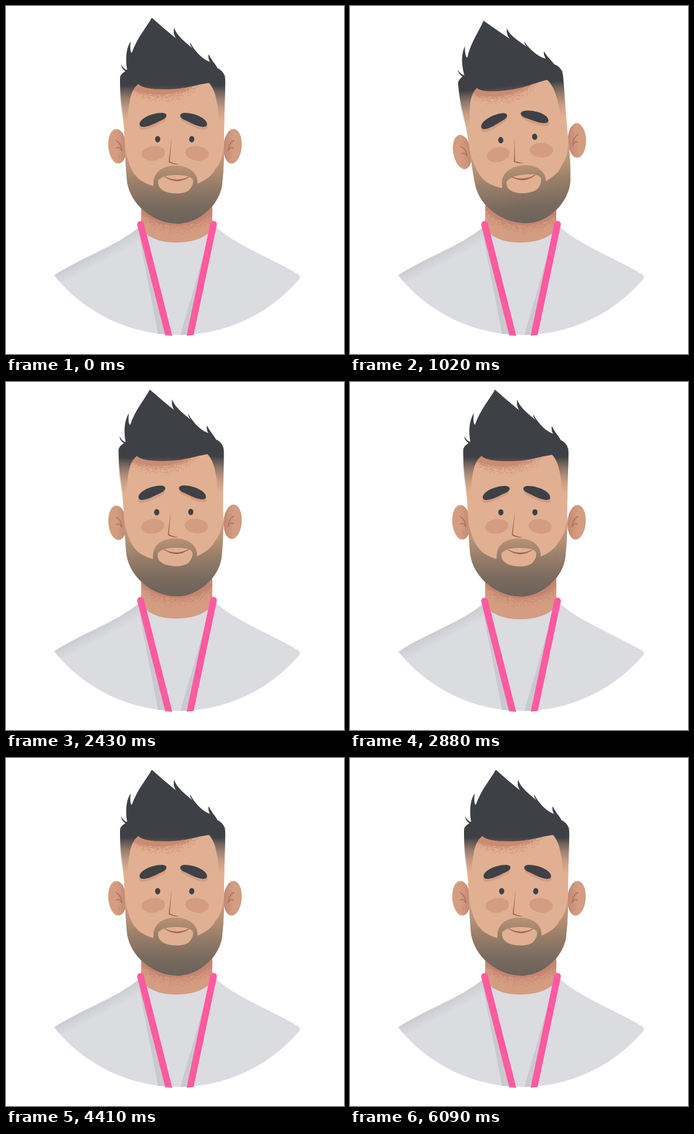
Write an HTML page with a canvas that moves like this. It is 575x593 px and loops after 6.15 s.

```html
<!DOCTYPE html>
<html lang="en">
<head>
<meta charset="utf-8">
<title>Portrait</title>
<style>
html, body { margin: 0; width: 100%; height: 100%; overflow: hidden; background: #fff; }
canvas { display: block; width: 575px; height: 593px; }
</style>
</head>
<body>
<canvas id="stage"></canvas>
<script>
const W = 575, H = 593, LOOP = 6150, STEP = 30;
const canvas = document.getElementById('stage');
const ctx = canvas.getContext('2d');
const dpr = window.devicePixelRatio || 1;
canvas.width = W * dpr;
canvas.height = H * dpr;

const INK = '#3d4146', SKIN = '#e1b092', BLUSH = '#d49d81', LINE = '#a5644f';
const SHIRT = '#dbdce0', FOLD = '#c9cacf', PINK = '#ff5aa0';

// Time/value pairs, eased in and out between neighbours
const TRACKS = {
  tilt: [150, 0, 1000, -.101, 1890, -.101, 2560, 0],
  sway: [30, 0, 600, -1.6, 1010, 0, 1890, 0, 2560, -1.6, 3900, 0],
  lift: [30, 0, 600, 9, 1010, 0, 1890, 0, 2560, 8.2, 3900, 0, 4680, 0, 5280, 11, 5460, 11, 6060, 0],
  breath: [30, 0, 550, 3, 1010, 0, 2430, 0, 3300, 2.2, 4380, 0, 4680, 0, 5280, -6, 5460, -6, 6060, 0],
  brow: [600, 0, 1020, .6, 1380, .6, 1680, 2, 1890, 2, 2430, .3, 3250, 0, 3850, 8, 4350, 0, 4680, 0, 5280, 6, 5460, 6, 6060, 0],
  blink: [5100, 0, 5310, 1, 5460, 1, 5700, 0],
  smile: [4680, 0, 5280, 1, 5460, 1, 6060, 0]
};

function valueAt(keys, t) {
  if (t <= keys[0]) return keys[1];
  for (let i = 2; i < keys.length; i += 2) {
    if (t < keys[i]) {
      const p = (t - keys[i - 2]) / (keys[i] - keys[i - 2]);
      return keys[i - 1] + (keys[i + 1] - keys[i - 1]) * (.5 - .5 * Math.cos(p * Math.PI));
    }
  }
  return keys[keys.length - 1];
}

function random(seed) {
  return () => (seed = (seed * 16807) % 2147483647) / 2147483647;
}

// Soft grain along the lower edge of an ellipse
function grainy(x, y, rx, ry, depth, count) {
  const rnd = random(count);
  const path = new Path2D();
  path.ellipse(x, y, rx, ry, 0, 0, 2 * Math.PI);
  for (let i = 0; i < count; i++) {
    const a = rnd() * Math.PI, d = depth * rnd() * rnd();
    path.rect(x + Math.cos(a) * (rx + d), y + Math.sin(a) * (ry + d), 1, 1);
  }
  return path;
}

function ramp(x0, y0, x1, y1, ...stops) {
  const g = ctx.createLinearGradient(x0, y0, x1, y1);
  for (let i = 0; i < stops.length; i += 2) g.addColorStop(stops[i], stops[i + 1]);
  return g;
}

const shapes = {
  shirt: new Path2D('M82 459C128 428 196 406 228 375L357 376C387 405 445 427 497 457Q502 460 500 464A270 270 0 0 1 82 459Z'),
  folds: new Path2D('M224 378L260 566H280L234 378ZM349 380L295 566H312L355 380Z'),
  neck: new Path2D('M230 315V375C240 412 335 412 351 378V315Z'),
  straps: new Path2D('M229 372L286.6 600M353 372L305 600'),
  head: new Path2D('M194 118C194 155 201 195 202 232C203 260 204 280 206 300C212 338 250 371 292 371C331 371 367 334 368 300C371 275 371 250 371 232C371 195 373 155 373 118Z'),
  hair: new Path2D('M198 197C195 172 194 150 194 125C194 117 198 115 203 111C198 107 196 104 196 99C199 106 203 108 206 109C203 90 204 73 212 60C211 70 211 77 214 80C223 54 238 38 248 20C261 31 274 43 289 55C285 48 285 43 286 37C290 50 303 60 317 72C314 68 313 65 313 62C318 71 331 90 347 95C344 90 344 86 345 82C349 92 355 97 360 106C368 110 373 116 373 127C373 152 372 175 370 197H362C361 166 356 141 345 131C316 136 303 142 270 142C246 142 231 139 225 133C210 144 210 167 206 197Z'),
  beard: new Path2D('M190 235H202C206 264 213 285 229 297Q240 304 251 307C249 283 266 272 288 272C310 272 327 283 326 303C337 297 350 291 356 278C365 268 369 255 371 235H390V400H190ZM259 297C258 309 263 311 268 315C282 321 299 321 310 315C316 309 319 303 318 296C314 289 303 288 288 288C274 288 264 291 259 297Z'),
  brow: new Path2D('M227.500 203C225 193 247 182 266 182C276 183 275 190 266 194C255 199 248 203 240 205C233 207 228.500 206 227.500 203Z'),
  nose: new Path2D('M282 224L278.5 264.5Q286 269 295 269.5Q286 271.5 276.5 266Z'),
  ear: new Path2D('M187 229Q197 235 197 247M188 242Q194 239 197 247'),
  neckShade: grainy(291, 310, 80, 64, 16, 1500),
  browShade: grainy(262, 125, 55, 26, 16, 900)
};

const fills = {
  shoulder: ramp(155, 416, 166, 436, 0, 'rgba(196,198,204,.75)', 1, 'rgba(196,198,204,0)'),
  ear: ramp(188, 0, 206, 0, 0, BLUSH, 1, '#bf8570'),
  hair: ramp(0, 135, 0, 197, 0, INK, .12, 'rgba(63,65,69,.8)', .35, 'rgba(75,70,68,.5)', .65, 'rgba(95,80,70,.22)', 1, 'rgba(120,90,72,0)'),
  beard: ramp(0, 236, 0, 371, 0, '#d3a588', .3, '#b38f74', .5, '#987e69', .78, '#796a5e', 1, '#6c625a')
};

function fill(path, style, rule = 'nonzero') {
  ctx.fillStyle = style;
  ctx.fill(path, rule);
}

function stroke(path, style, width) {
  ctx.strokeStyle = style;
  ctx.lineWidth = width;
  ctx.stroke(path);
}

function group(draw) {
  ctx.save();
  draw();
  ctx.restore();
}

function shifted(x, y, draw) {
  group(() => { ctx.translate(x, y); draw(); });
}

function turned(x, y, angle, draw) {
  group(() => {
    ctx.translate(x, y);
    ctx.rotate(angle);
    ctx.translate(-x, -y);
    draw();
  });
}

// Draws once as is and once mirrored about a vertical axis
function both(axis, draw) {
  draw();
  group(() => {
    ctx.translate(2 * axis, 0);
    ctx.scale(-1, 1);
    draw();
  });
}

function oval(x, y, rx, ry, style, angle = 0) {
  const path = new Path2D();
  path.ellipse(x, y, rx, ry, angle, 0, 2 * Math.PI);
  fill(path, style);
}

function jawShift(p) {
  return -.75 * p.lift - p.smile;
}

function drawBody(p) {
  group(() => {
    ctx.translate(292, 562);
    ctx.scale(1 - p.breath * .0016, 1 - p.breath / 196);
    ctx.translate(-292, -562);
    fill(shapes.shirt, SHIRT);
    ctx.clip(shapes.shirt);
    ctx.fillStyle = fills.shoulder;
    ctx.fillRect(80, 370, 147, 100);
    fill(shapes.folds, FOLD);
  });
  shifted(0, p.breath, () => {
    fill(shapes.neck, BLUSH);
    ctx.clip(shapes.neck);
    ctx.translate(0, jawShift(p) - p.breath);
    turned(287, 228, p.tilt, () => fill(shapes.neckShade, '#c48470'));
  });
  group(() => {
    const disc = new Path2D();
    disc.arc(292, 292, 270, 0, 2 * Math.PI);
    ctx.clip(disc);
    ctx.translate(0, p.breath);
    stroke(shapes.straps, PINK, 11.5);
  });
}

function drawEye(p) {
  if (p.blink > .85) {
    stroke(new Path2D('M252.5 228Q258 225 263.5 228'), INK, 3);
  } else {
    oval(258, 227, 4.4 + p.blink * 2, 5.4 * (1 - p.blink), INK);
  }
}

function drawMouth(s) {
  const x0 = 270 - 6 * s, x1 = 312 + 4 * s, mid = (x0 + x1) / 2;
  const y = 291 + s;
  const lip = new Path2D(`M${x0} ${y}Q${mid} ${y + 10.5} ${x1} ${y}Q${mid} ${y + 14.5} ${x0} ${y}Z`);
  fill(lip, '#9e5f50');
  stroke(lip, '#9e5f50', .7);
}

function drawEars(p) {
  shifted(0, 2.3 * p.smile, () => both(287.5, () => {
    oval(189.5, 239, 15.5, 29.5, fills.ear, -.08);
    stroke(shapes.ear, '#ad715c', 1.5);
  }));
}

function drawHead(p) {
  const jaw = jawShift(p);
  group(() => {
    ctx.translate(0, jaw);
    fill(shapes.head, SKIN);
    ctx.clip(shapes.head);
    shifted(0, -p.lift - jaw, () => fill(shapes.browShade, '#c98b73'));
    ctx.translate(0, -3.3 * p.smile);
    fill(shapes.beard, fills.beard, 'evenodd');
  });
  shifted(0, -p.lift, () => fill(shapes.hair, fills.hair));
}

function drawFace(p) {
  const lean = 14 * p.tilt;
  shifted(lean, lean - .7 * p.lift - 3 * p.smile, () => {
    both(288, () => oval(251, 251, 20, 12.5, BLUSH, -.12));
    both(287, () => drawEye(p));
    shifted(0, -p.smile, () => fill(shapes.nose, LINE));
    shifted(0, -2.5 * p.smile, () => drawMouth(p.smile));
    both(284.7, () => {
      turned(250, 194, -.012 * p.brow, () => {
        shifted(-1, 5 - p.brow * .4, () => fill(shapes.brow, BLUSH));
        shifted(0, -p.brow, () => fill(shapes.brow, INK));
      });
    });
  });
}

function render(t) {
  const pose = {};
  for (const name in TRACKS) pose[name] = valueAt(TRACKS[name], t);
  ctx.setTransform(dpr, 0, 0, dpr, 0, 0);
  ctx.lineCap = 'round';
  ctx.fillStyle = '#fff';
  ctx.fillRect(0, 0, W, H);
  drawBody(pose);
  turned(287, 228, pose.tilt, () => {
    drawEars(pose);
    ctx.translate(pose.sway, 0);
    drawHead(pose);
    drawFace(pose);
  });
}

const start = performance.now();
function tick() {
  const t = (performance.now() - start) % LOOP;
  render(Math.floor(t / STEP) * STEP);
  requestAnimationFrame(tick);
}
tick();
</script>
</body>
</html>
```
